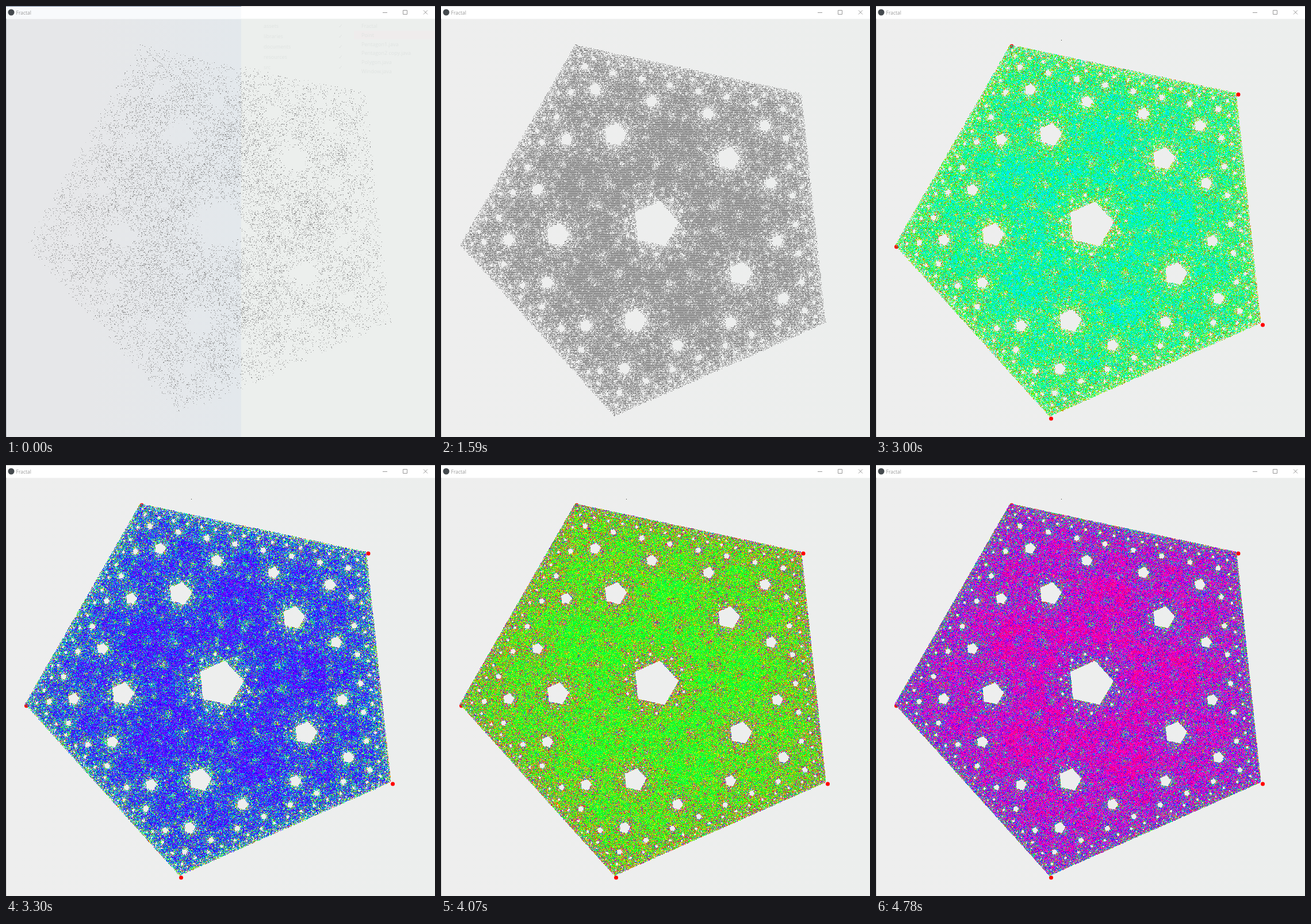
An HTML page with a canvas for the animation above (6010 ms loop, 746x750 px).

```html
<!DOCTYPE html>
<html lang="en">
<head>
<meta charset="utf-8">
<title>Fractal</title>
<style>
  html, body { margin: 0; width: 100%; height: 100%; overflow: hidden; background: #eee; }
  svg, canvas { position: absolute; left: 0; top: 0; width: 746px; height: 750px; }
  text { font-family: "Open Sans", "Noto Sans", sans-serif; }
</style>
</head>
<body>
<svg viewBox="0 0 746 750">
  <defs>
    <linearGradient id="panel"><stop stop-color="#eee"/><stop offset="1" stop-color="#eceeed"/></linearGradient>
    <linearGradient id="cool"><stop offset=".35" stop-color="#e6e7e9"/><stop offset="1" stop-color="#e3e8ec"/></linearGradient>
  </defs>
  <rect width="746" height="750" fill="url(#panel)"/>
  <rect width="746" height="22.5" fill="#fff"/>
  <path d="M0 .5H746M.5 22V750" stroke="#ccc"/>

  <!-- desktop showing through while the window fades in -->
  <g id="ghost">
    <rect y="22.5" width="409" height="728" fill="url(#cool)"/>
    <rect x="409" y="22.5" width="337" height="728" fill="#ecefed"/>
    <rect width="409" height="22.5" fill="#f8fafc"/>
    <path d="M0 .5H409" stroke="#6b7d97"/>
    <path d="M.5 22V750" stroke="#b4b8c0"/>
    <rect x="605" y="43" width="141" height="15" fill="#efecec"/>
    <g id="list" font-size="9" fill="#dfe3e1"></g>
  </g>

  <circle cx="9" cy="11" r="5.5" fill="#454a4e"/>
  <text x="17.5" y="14.7" font-size="8.5" fill="#999">Fractal</text>
  <path d="M655 11.5H663M690.5 7.5H697.5V14.5H690.5ZM726 7.5L733 14.5M733 7.5L726 14.5" fill="none" stroke="#999"/>

  <g id="markers" fill="#f00"><rect x="322" y="59" width="1" height="1" fill="#222"/></g>
</svg>
<canvas id="points" width="746" height="750"></canvas>
<script>
const LOOP = 6010, COLOR_START = 2280, POINTS_PER_DEGREE = 4000, FIRST_HUE = -8;
const WIDTH = 746, HEIGHT = 750;
const corners = [[233, 67], [627, 151], [669.5, 552], [301.5, 715], [32.5, 416]];

// Screen refreshes: first time, last time, number of evenly spaced updates.
const bursts = [
  [70, 350, 5], [520, 670, 3], [820, 1060, 4], [1210, 1440, 4], [1590, 1750, 3],
  [1900, 2050, 3], [2280, 2450, 3], [2600, 2830, 4], [3000, 3150, 3],
  [3300, 3690, 6], [3840, 4070, 4], [4240, 4390, 3], [4540, 4780, 4]
];
const grayCounts = [[0, 25000], [1590, 380000], [2050, 500000]];
const hues = [[2280, 4], [2450, 42], [3000, 195], [3610, 368], [4070, 508], [4780, 700]];

const SVG = "http://www.w3.org/2000/svg";
function add(parent, tag, attributes, text = "") {
  const node = document.createElementNS(SVG, tag);
  for (const name in attributes) node.setAttribute(name, attributes[name]);
  node.textContent = text;
  parent.append(node);
}

const ghost = document.getElementById("ghost");
const list = document.getElementById("list");
const markers = document.getElementById("markers");
corners.forEach(([x, y]) => add(markers, "circle", { cx: x + 3, cy: y + 3, r: 3.5 }));
["assets", "libraries", "documents", "resources", "src"].forEach((label, i) => {
  add(list, "text", { x: 448, y: 38 + i * 18 }, label);
  add(list, "text", { x: 578, y: 38 + i * 18 }, "✓");
});
["Fractal", "Point", "Pentagon1.java", "Pentagon2 copy.java", "Polygon.java", "Window.java"].forEach((label, i) =>
  add(list, "text", { x: 618, y: 38 + i * 15.8 }, label));

const context = document.getElementById("points").getContext("2d");
const image = context.createImageData(WIDTH, HEIGHT);
const pixels = new Uint32Array(image.data.buffer);
const rgba = (r, g, b) => (255 << 24 | b << 16 | g << 8 | r) >>> 0;

const palette = Array.from({ length: 360 }, (_, hue) => {
  const channel = shift => {
    const k = (shift + hue / 60) % 6;
    return Math.round(255 * (1 - Math.max(0, Math.min(k, 4 - k, 1))));
  };
  return rgba(channel(5), channel(3), channel(1));
});
const darkGray = rgba(128, 128, 128), lightGray = rgba(200, 200, 200);

function interpolate(keys, time) {
  const i = keys.findIndex(key => key[0] > time);
  if (i < 0) return keys[keys.length - 1][1];
  const [t0, v0] = keys[i - 1], [t1, v1] = keys[i];
  return v0 + (v1 - v0) * (time - t0) / (t1 - t0);
}

function refreshTime(time) {
  let shown = 0;
  for (const [first, last, count] of bursts) {
    if (time < first) break;
    const gap = (last - first) / (count - 1);
    shown = first + gap * Math.min(count - 1, Math.floor((time + 4 - first) / gap));
  }
  return shown;
}

let x, y, seed, drawn, colored;
function restart(inColor) {
  [x, y] = corners[0];
  seed = inColor ? 77 : 12345;
  drawn = 0;
  colored = inColor;
  pixels.fill(0);
}

// Chaos game: jump halfway to a random corner and mark the spot.
function plotUntil(total) {
  for (; drawn < total; drawn++) {
    seed = (Math.imul(seed, 1664525) + 1013904223) >>> 0;
    const corner = corners[Math.floor(seed / 4294967296 * 5)];
    x = (x + corner[0]) / 2;
    y = (y + corner[1]) / 2;
    const row = y | 0;
    pixels[row * WIDTH + (x | 0)] = colored
      ? palette[Math.floor(drawn / POINTS_PER_DEGREE + FIRST_HUE + 360) % 360]
      : row % 3 ? darkGray : lightGray;
  }
}

let lastShown = -1;
function render(now) {
  const shown = refreshTime(now % LOOP);
  if (shown !== lastShown) {
    const inColor = shown >= COLOR_START;
    if (inColor !== colored || shown < lastShown) restart(inColor);
    plotUntil(inColor
      ? (interpolate(hues, shown) - FIRST_HUE) * POINTS_PER_DEGREE
      : interpolate(grayCounts, shown));
    context.putImageData(image, 0, 0);
    markers.style.display = inColor ? "" : "none";
    ghost.style.opacity = Math.max(0, 1 - shown / 115);
    lastShown = shown;
  }
  requestAnimationFrame(render);
}
render(performance.now());
</script>
</body>
</html>
```
